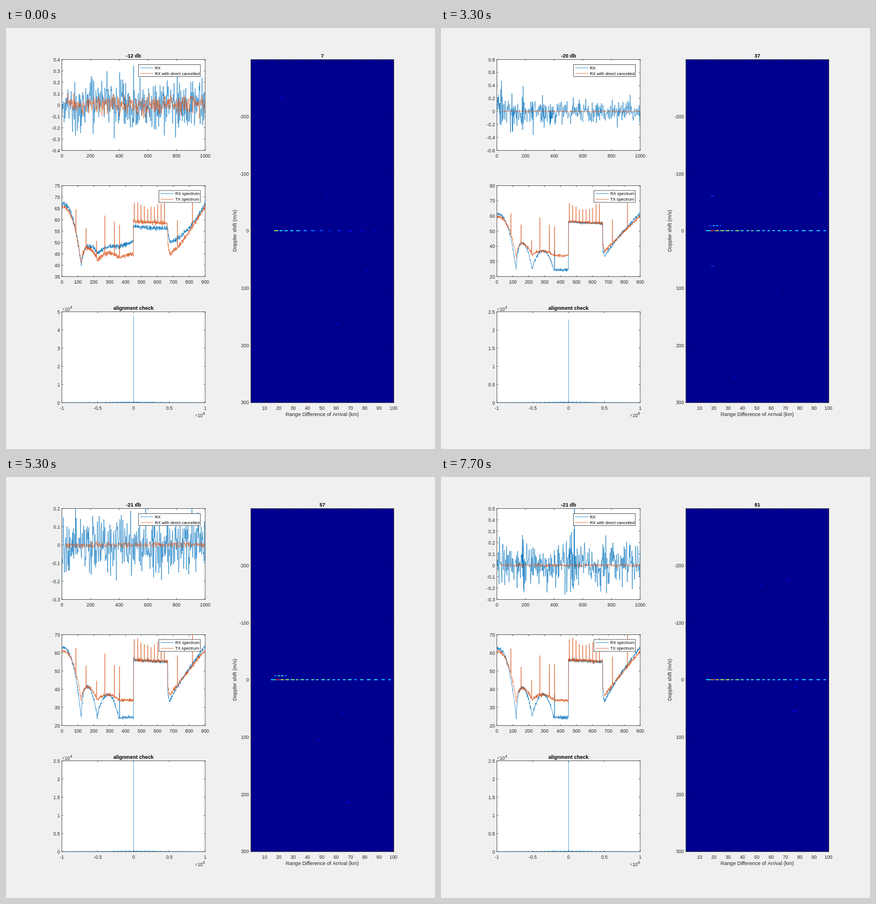
These frames come from a looping animation (756 px wide and 741 px high, 7.9 s). An HTML page with a canvas:

```html
<!DOCTYPE html>
<html lang="en">
<head>
<meta charset="utf-8">
<title>Signal plots</title>
<style>
html, body { margin: 0; width: 100%; height: 100%; overflow: hidden; background: #f0f0f0; }
canvas { display: block; width: 756px; height: 741px; }
</style>
</head>
<body>
<canvas id="stage" width="756" height="741"></canvas>
<script>
const ctx = document.getElementById('stage').getContext('2d');
const LOOP = 7900, BLUE = '#0072bd', ORANGE = '#d95319', INK = '#262626';
const FONT = '"Liberation Sans", Arial, sans-serif';

// Key states: axis ranges are [min, max, tick]; edge lifts the spectrum ends (dB).
const states = [
  { step: 0, db: -12, y: [-0.4, 0.4, 0.1], sigma: 0.13, rest: 0.046, spec: [35, 75, 5], edge: 0, peak: 4.77, top: [0, 5, 1] },
  { step: 5, db: -19, y: [-0.3, 0.3, 0.1], sigma: 0.092, rest: 0.006, spec: [20, 70, 10], edge: -0.5, peak: 1.82, top: [0, 2, 0.5] },
  { step: 9, db: -20, y: [-0.6, 0.8, 0.2], sigma: 0.1, rest: 0.007, spec: [20, 70, 10], edge: 1, peak: 2.05, top: [0, 2, 0.5],
    bursts: [55, 100, 160, 250, 270, 350, 465, 570, 725, 855, 950] },
  { step: 15, db: -20, y: [-0.6, 0.8, 0.2], sigma: 0.09, rest: 0.007, spec: [20, 80, 10], edge: 1.5, peak: 2.28, top: [0, 2.5, 0.5],
    bursts: [5, 32, 105, 180, 250, 320, 375] },
  { step: 21, db: -21, y: [-0.3, 0.2, 0.1], sigma: 0.084, rest: 0.009, spec: [20, 70, 10], edge: 1.5, peak: 2.55, top: [0, 2.5, 0.5] },
  { step: 30, db: -22, y: [-0.5, 0.5, 0.5], sigma: 0.095, rest: 0.007, spec: [20, 80, 10], edge: 5, peak: 2.6, top: [0, 3, 0.5],
    bursts: [30, 378, 478] },
  { step: 37, db: -21, y: [-0.3, 0.5, 0.1], sigma: 0.095, rest: 0.008, spec: [20, 70, 10], edge: 2.5, peak: 2.55, top: [0, 2.5, 0.5],
    bursts: [185, 515, 540] }
];

// Spectrum levels: three notches with two humps, a plateau, a dip and a rising tail.
const rawRx = { left: 67, notch1: 39.5, hump1: 6.5, notch2: 45, hump2: 1.5, notch3: 48, floor: 50.5, plateau: 57, dip: 50.5, right: 67, curve: 1.7 };
const rawTx = { left: 65.5, notch1: 40.5, hump1: 6.5, notch2: 42, hump2: 2.5, notch3: 43.5, floor: 45, plateau: 59.3, dip: 45, right: 66, curve: 1.3 };
const cleanRx = { left: 60, notch1: 24, hump1: 19, notch2: 24.5, hump2: 12.5, notch3: 24.5, floor: 24.5, plateau: 56, dip: 33, right: 60.5, curve: 0.85 };
const cleanTx = { left: 58, notch1: 33.5, hump1: 9, notch2: 34, hump2: 3, notch3: 34, floor: 33.8, plateau: 56.2, dip: 36.5, right: 58.5, curve: 0.95 };
// Narrow carriers: [bin, rise in dB]
const carriers = [[88, 14], [152, 12], [218, 9], [270, 22], [330, 18], [362, 19], [726, 16], [820, 18]];
for (let i = 0; i < 10; i++) carriers.push([455 + 21 * i, 10 + 2 * Math.cos(i * 0.7)]);

const lerp = (a, b, p) => a + (b - a) * p;
const bell = (x, mid, width) => Math.exp(-(((x - mid) / width) ** 2));

function randomFrom(seed) {
  return () => {
    seed = (seed + 0x6d2b79f5) | 0;
    let h = Math.imul(seed ^ (seed >>> 15), seed | 1);
    h ^= h + Math.imul(h ^ (h >>> 7), h | 61);
    return ((h ^ (h >>> 14)) >>> 0) / 4294967296;
  };
}
const gaussFrom = random => () => (random() + random() + random() + random() - 2) * 1.73;

function jet(v) {
  const channel = mid => Math.round(255 * Math.max(0, Math.min(1, 1.5 - Math.abs(4 * v - mid))));
  return `rgb(${channel(3)},${channel(2)},${v < 0.125 ? Math.round(143 + 896 * v) : channel(1)})`;
}

function text(str, x, y, size = 8.25, align = 'center', weight = 'normal', color = INK) {
  ctx.font = `${weight} ${size}px ${FONT}`;
  ctx.textAlign = align;
  ctx.fillStyle = color;
  ctx.fillText(str, x, y);
}
const title = (str, x, y) => text(str, x, y, 9.05, 'center', 'bold', '#000');

function power(exp, x, y) {
  text('×', x, y, 8.25, 'left', 'normal', '#777');
  text('10', x + 5, y, 8.25, 'left');
  text(exp, x + 14.4, y - 4, 6.6, 'left');
}

function segment(x1, y1, x2, y2, color = INK, width = 0.65) {
  ctx.strokeStyle = color;
  ctx.lineWidth = width;
  ctx.beginPath();
  ctx.moveTo(x1, y1);
  ctx.lineTo(x2, y2);
  ctx.stroke();
}

function box(x, y, width, height, fill) {
  ctx.fillStyle = fill;
  ctx.fillRect(x, y, width, height);
  ctx.strokeStyle = INK;
  ctx.lineWidth = 0.7;
  ctx.strokeRect(x, y, width, height);
}

function panel(top, [x0, x1, dx], [y0, y1, dy], drawData) {
  const left = 98.5, width = 252.5, height = 160, right = left + width, bottom = top + height;
  const px = x => left + (x - x0) / (x1 - x0) * width;
  const py = y => bottom - (y - y0) / (y1 - y0) * height;
  box(left, top, width, height, '#fff');
  for (let x = x0; x <= x1 + dx / 9; x += dx) {
    segment(px(x), bottom, px(x), bottom - 2.5);
    segment(px(x), top, px(x), top + 2.5);
    text(+x.toFixed(2), px(x), bottom + 12);
  }
  for (let y = y0; y <= y1 + dy / 9; y += dy) {
    segment(left, py(y), left + 2.5, py(y));
    segment(right, py(y), right - 2.5, py(y));
    text(+y.toFixed(2) || 0, 95, py(y) + 3, 8.25, 'right');
  }
  ctx.save();
  ctx.beginPath();
  ctx.rect(left, top, width, height);
  ctx.clip();
  drawData((points, color) => {
    ctx.strokeStyle = color;
    ctx.lineWidth = 0.65;
    ctx.lineJoin = 'round';
    ctx.beginPath();
    points.forEach(([x, y]) => ctx.lineTo(px(x), py(y)));
    ctx.stroke();
  });
  ctx.restore();
}

function legend(x, y, width, names) {
  box(x, y, width, 21, '#fff');
  names.forEach((name, i) => {
    const row = y + 5.5 + i * 10;
    segment(x + 3, row, x + 26, row, i ? ORANGE : BLUE, 0.7);
    text(name, x + 28.7, row + 2.8, 7.4, 'left', 'normal', '#000');
  });
}

// Noise that varies over a few samples rather than at each one.
function smoothNoise(gauss) {
  const nodes = Array.from({ length: 402 }, gauss);
  return i => {
    const n = Math.floor(i / 2.5);
    return lerp(nodes[n], nodes[n + 1], i / 2.5 - n);
  };
}

function drawSignal(state, gauss) {
  const wave = smoothNoise(gauss), residue = smoothNoise(gauss);
  const rx = [], clean = [];
  for (let i = 0; i < 1000; i++) {
    const burst = (state.bursts || []).reduce((sum, mid) => sum + 0.14 * bell(i, mid, 11), 0);
    rx.push([i, state.sigma * wave(i) + burst * gauss()]);
    if (i >= 25) clean.push([i, state.rest * residue(i)]);
  }
  panel(55.5, [0, 1000, 200], state.y, plot => {
    plot(rx, BLUE);
    plot(clean, ORANGE);
  });
  legend(233.5, 64.5, 109, ['RX', 'RX with direct cancelled']);
}

function arch(u) {
  return Math.sin(Math.PI * u) ** 0.75;
}

function level(s, x, edge, step) {
  if (x < 122) return lerp(s.left + edge, s.notch1, (x / 122) ** 2.5);
  if (x < 222) {
    const u = (x - 122) / 100;
    return lerp(s.notch1, s.notch2, u) + (s.hump1 - step * 0.06) * arch(u ** 0.7);
  }
  if (x < 355) {
    const u = (x - 222) / 133;
    return lerp(s.notch2, s.notch3, u) + s.hump2 * arch(u);
  }
  if (x < 450) return lerp(s.notch3, s.floor, (x - 355) / 95);
  if (x < 665) return s.plateau - (x - 452) / 213;
  if (x < 677) return s.dip + (677 - x) * 0.4;
  return lerp(s.dip, s.right + edge, ((x - 677) / 223) ** s.curve);
}

function drawSpectra(state, from, to, mix, step, gauss) {
  const rawness = from === 0 ? 1 - mix : 0;
  const edge = lerp(states[from].edge, states[to].edge, mix);
  const trace = (raw, clean) => Array.from({ length: 900 }, (_, x) =>
    [x, lerp(level(clean, x, edge, step), level(raw, x, 0, 0), rawness) + 0.5 * gauss()]);
  const rx = trace(rawRx, cleanRx), tx = trace(rawTx, cleanTx);
  carriers.forEach(([x, rise]) => { tx[x][1] += rise * (1 - 0.25 * rawness); });
  rx[362][1] += 13 * (1 - rawness);
  panel(277.5, [0, 900, 100], state.spec, plot => {
    plot(rx, BLUE);
    plot(tx, ORANGE);
  });
  legend(269.5, 286, 73, ['RX spectrum', 'TX spectrum']);
}

function drawAlignment(state, random) {
  const max = state.top[1];
  const floor = Array.from({ length: 506 }, (_, i) => {
    const x = i / 252.5 - 1, height = i % 14 === 0 ? 2 : 0.8 + 0.5 * random();
    return [x, i % 2 ? 0 : max / 160 * height * bell(x, 0, 0.7)];
  });
  panel(499.5, [-1, 1, 0.5], state.top, plot => {
    plot(floor, BLUE);
    plot([[0, 0], [0, state.peak]], BLUE);
  });
  title('alignment check', 224.7, 495.5);
  power('4', 98.5, 498);
  power('6', 332.5, 685);
}

function blip(x, y, width, strength) {
  ctx.fillStyle = jet(strength * 0.5);
  ctx.fillRect(x - 0.6, y, width + 1.2, 1.5);
  ctx.fillStyle = jet(strength);
  ctx.fillRect(x, y, width, 1.5);
}

// Broken line of returns at zero shift, hottest near its left end.
function drawZeroLine(step, random) {
  const weak = step < 2, layout = randomFrom(41);
  blip(weak ? 471 : 467, 355.9, weak ? 90 : 215, 0.035);
  if (!weak) blip(467, 355.9, 9, 0.38);
  for (let x = weak ? 473 : 475; x < (weak ? 650 : 679);) {
    const far = (x - 475) / 205, width = 3 + layout() * 4;
    const strength = weak ? 0.53 * Math.exp(-2 * far) : 0.4 + 0.2 * (1 - far) ** 2 + 0.33 * bell(x, 477, 8);
    blip(x, 355.9, width, strength * (0.85 + 0.2 * random()));
    x += width + (weak ? 3 + far * 20 : 1 + far * 6 + layout() * 3);
  }
}

function drawEchoes(step, random) {
  for (let i = 0; i < 26; i++)
    blip(472 + random() * 204, 62 + random() * 590, 2 + random() * 4, 0.015 + 0.1 * random() ** 4);
  if (step > 2) {
    const drift = 58.5 + (step - 5) * 0.3, strength = 0.28 * bell(step, 6, 14);
    blip(476, 356.7 - drift, 4, strength);
    blip(476, 356.7 + drift, 4, strength);
  }
  if (step > 12 && step < 32) {
    const s = step - 15;
    const y = 347 - 0.383 * s + 0.146 * s * (s - 6);
    for (let i = 0; i < 4; i++)
      blip(473 + i * 6, y, 3.5, 0.52 * bell(step, 22, 11) * bell(i, 1.5, 2));
  }
}

function drawMap(step, random) {
  const left = 431.5, top = 55.5, right = 683.5, bottom = 659.5;
  box(left, top, right - left, bottom - top, jet(0));
  drawEchoes(step, random);
  drawZeroLine(step, random);
  for (let km = 10; km <= 100; km += 10) {
    const x = 430.3 + km * 2.524;
    segment(x, bottom, x, bottom - 5);
    segment(x, top, x, top + 5);
    text(km, x, 671.5);
  }
  for (let speed = -200; speed <= 300; speed += 100) {
    const y = 357.3 + speed * 1.0065;
    segment(left, y, left + 5, y);
    segment(right, y, right - 5, y);
    text(speed, 428, y + 3, 8.25, 'right');
  }
  title(7 + 2 * step, 557.5, 51.5);
  text('Range Difference of Arrival (km)', 557.3, 683, 9.05);
  ctx.save();
  ctx.translate(406, 357);
  ctx.rotate(-Math.PI / 2);
  text('Doppler shift (m/s)', 0, 0, 9.05);
  ctx.restore();
}

function draw(step) {
  const to = Math.max(1, states.findIndex(s => s.step >= step)), from = to - 1;
  const mix = (step - states[from].step) / (states[to].step - states[from].step);
  const state = states[mix < 0.5 ? from : to];
  const random = randomFrom(step * 7919 + 17), gauss = gaussFrom(random);
  ctx.fillStyle = '#f0f0f0';
  ctx.fillRect(0, 0, 756, 741);
  drawSignal(state, gauss);
  title(`${Math.round(lerp(states[from].db, states[to].db, mix))} db`, 224.7, 51.5);
  drawSpectra(state, from, to, mix, step, gauss);
  drawAlignment(state, random);
  drawMap(step, random);
}

let shown = -1;
const start = performance.now();
function tick() {
  const t = (performance.now() - start) % LOOP;
  const step = t < 500 ? 0 : 1 + Math.floor((t - 500) / 200);
  if (step !== shown) draw(shown = step);
  requestAnimationFrame(tick);
}
tick();
</script>
</body>
</html>
```
